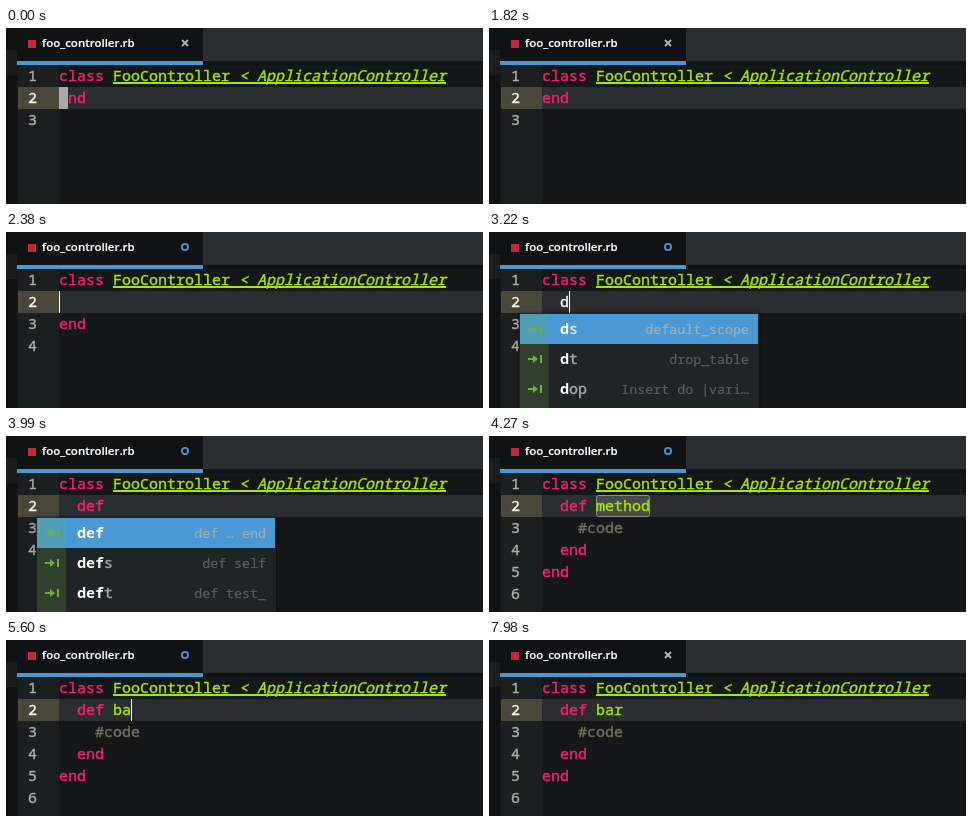
Animation of 477x176 px, one loop 8 s. Source, as an HTML page with a canvas:

```html
<!DOCTYPE html>
<html lang="en">
<head>
<meta charset="utf-8">
<title>Snippet completion</title>
<style>
html, body { margin: 0; width: 100%; height: 100%; overflow: hidden; background: #151718; }
canvas { display: block; }
</style>
</head>
<body>
<canvas id="stage" width="477" height="176"></canvas>
<script>
const ctx = document.getElementById('stage').getContext('2d');
const LOOP = 8000, LEFT = 53, TOP = 37, CHAR = 9, LINE = 22, ROW = 30;
const MONO = '"Noto Sans Mono", monospace';
const CODE = '15px ' + MONO;
const C = {
  bg: '#151718', tab: '#111213', gutter: '#1c1f20', side: '#0f1112',
  bar: '#2a2e31', line: '#2a2e30', mark: '#49473a', blue: '#4a99d5',
  block: '#a9a9a8', pink: '#f92070', green: '#a6e40f', grey: '#75715e',
  white: '#f8f8f2', num: '#adafac', popup: '#212425', dim: '#5c5f60',
  arrow: '#6fae45', close: '#b4b7b8'
};

// Each popup row: name, description
const ROWS = {
  d: [['ds', 'default_scope'], ['dt', 'drop_table'], ['dop', 'Insert do |vari…']],
  de: [['def', 'def … end'], ['defs', 'def self'], ['deft', 'def test_']],
  b: [['bt', 'belongs_to'], ['begin', 'rescue block'], ['bool', 't.boolean']]
};

function rect(x, y, w, h, color) {
  ctx.fillStyle = color;
  ctx.fillRect(x, y, w, h);
}

// A fine outline gives the text its heavier, smoothed weight
function text(str, x, y, color, font = CODE, align = 'left', weight = 0.4) {
  ctx.font = font;
  ctx.textAlign = align;
  ctx.fillStyle = ctx.strokeStyle = color;
  ctx.lineWidth = weight;
  ctx.lineJoin = 'round';
  ctx.fillText(str, x, y);
  if (weight) ctx.strokeText(str, x, y);
}

function stroke(points, color, width) {
  ctx.strokeStyle = color;
  ctx.lineWidth = width;
  ctx.beginPath();
  points.forEach(([x, y], i) => i ? ctx.lineTo(x, y) : ctx.moveTo(x, y));
  ctx.stroke();
}

const colX = col => LEFT + col * CHAR;
const rowY = row => TOP + (row - 1) * LINE;
const code = (row, col, str, color, font) => text(str, colX(col), rowY(row) + 16, color, font);

// Last entry of [time, value] pairs that has started
function at(t, steps) {
  let value;
  for (const [start, v] of steps) if (t >= start) value = v;
  return value;
}

// Cursor as [line, column], or null while hidden
const CURSOR = [
  [0, null], [1400, [2, 0]], [1820, null], [1890, [3, 0]], [2380, [2, 0]],
  [2730, [2, 2]], [3080, [2, 3]], [3290, [2, 4]], [3500, [2, 5]],
  [3990, null], [4200, [2, 5]], [4270, null], [5180, [2, 7]], [5530, [2, 8]],
  [5740, [2, 9]], [6300, null], [6720, [2, 9]], [7140, null],
  [7560, [2, 9]], [7980, null]
];
const TYPED = [[0, ''], [3080, 'd'], [3290, 'de'], [3500, 'def']];
const METHOD = [[0, 'method'], [5180, 'b'], [5530, 'ba'], [5740, 'bar']];
const POPUP = [
  [0, null], [3220, 'd'], [3360, 'de'], [4200, null], [5250, 'b'], [5600, null]
];

function drawTab(t) {
  rect(0, 0, 11, 176, C.side);
  rect(0, 22, 11, 25, '#1b1d1f');
  rect(11, 0, 186, 33, C.tab);
  rect(197, 0, 280, 33, C.bar);
  rect(197, 33, 280, 4, C.tab);
  rect(11, 33, 186, 4, C.blue);
  rect(22, 12, 8, 8, '#c4283c');
  text('foo_controller.rb', 36, 19, '#fff', '600 11.5px "Open Sans", sans-serif', 'left', 0.2);
  if (t >= 2240 && t < 7350) {
    ctx.strokeStyle = C.blue;
    ctx.lineWidth = 1.8;
    ctx.beginPath();
    ctx.arc(179, 15, 3.1, 0, Math.PI * 2);
    ctx.stroke();
  } else {
    stroke([[176, 12], [182, 18]], C.close, 1.8);
    stroke([[182, 12], [176, 18]], C.close, 1.8);
  }
}

function drawGutter(t) {
  const count = at(t, [[0, 3], [1890, 4], [4270, 6]]);
  const active = t >= 1890 && t < 2380 ? 3 : 2;
  rect(12, 37, 41, 139, C.gutter);
  rect(12, rowY(active), 41, LINE, C.mark);
  rect(LEFT, rowY(active), 477 - LEFT, LINE, C.line);
  for (let n = 1; n <= count; n++) {
    text(n, 22, rowY(n) + 16, n === active ? C.white : C.num);
  }
}

function drawCode(t) {
  code(1, 0, 'class', C.pink);
  code(1, 6, 'FooController', C.green);
  code(1, 20, '< ApplicationController', C.green, 'italic ' + CODE);
  rect(colX(6), 54, 37 * CHAR, 2, C.green);

  if (t < 4270) {
    code(t < 1890 ? 2 : 3, 0, 'end', C.pink);
    const typed = at(t, TYPED);
    code(2, 2, typed, typed === 'def' ? C.pink : C.white);
  } else {
    if (t < 5180) drawSelection();
    code(2, 2, 'def', C.pink);
    code(2, 6, at(t, METHOD), C.green);
    code(3, 4, '#code', C.grey);
    code(4, 2, 'end', C.pink);
    code(5, 0, 'end', C.pink);
  }
}

function drawSelection() {
  ctx.beginPath();
  ctx.roundRect(107.5, 59.5, 53, 21, 2);
  ctx.fillStyle = '#4b4b46';
  ctx.fill();
  ctx.strokeStyle = '#8f908b';
  ctx.lineWidth = 1;
  ctx.stroke();
}

function drawCursor(t) {
  if (t < 1400) return rect(LEFT, 59, CHAR, LINE, C.block);
  const pos = at(t, CURSOR);
  if (pos) rect(colX(pos[1]), rowY(pos[0]), 1, LINE, C.white);
}

function drawArrow(x, y) {
  stroke([[x, y], [x + 6, y]], C.arrow, 2);
  ctx.fillStyle = C.arrow;
  ctx.beginPath();
  ctx.moveTo(x + 5, y - 4);
  ctx.lineTo(x + 10, y);
  ctx.lineTo(x + 5, y + 4);
  ctx.fill();
  rect(x + 12, y - 4, 2, 8, C.arrow);
}

function drawPopup(t) {
  const key = at(t, POPUP);
  if (!key) return;
  const [x, right] = key === 'b' ? [66, 288] : [30, 270];
  const prefix = key === 'de' && t >= 3500 ? 'def' : key;

  ctx.save();
  ctx.shadowColor = 'rgba(0,0,0,.5)';
  ctx.shadowBlur = 3;
  rect(x, 81, right - x, 100, C.popup);
  ctx.restore();
  rect(x + 1, 82, right - x - 2, ROW, C.blue);
  rect(x + 1, 82, 29, 94, 'rgba(111,174,69,.2)');

  ROWS[key].forEach(([name, info], i) => {
    const y = 82 + i * ROW, on = i === 0;
    drawArrow(x + 9, y + 15);
    text(prefix, x + 41, y + 20, '#fff', 'bold ' + CODE, 'left', 0);
    text(name.slice(prefix.length), x + 41 + prefix.length * CHAR, y + 20,
      on ? '#dfe8ee' : '#a5a8a9');
    text(info, right - 10, y + 20, on ? '#a5adb2' : C.dim, '13.3px ' + MONO, 'right', 0.2);
  });
}

function draw(t) {
  rect(0, 0, 477, 176, C.bg);
  drawTab(t);
  drawGutter(t);
  drawCode(t);
  drawCursor(t);
  drawPopup(t);
}

const start = performance.now();
function tick() {
  draw((performance.now() - start) % LOOP);
  requestAnimationFrame(tick);
}
tick();
</script>
</body>
</html>
```
